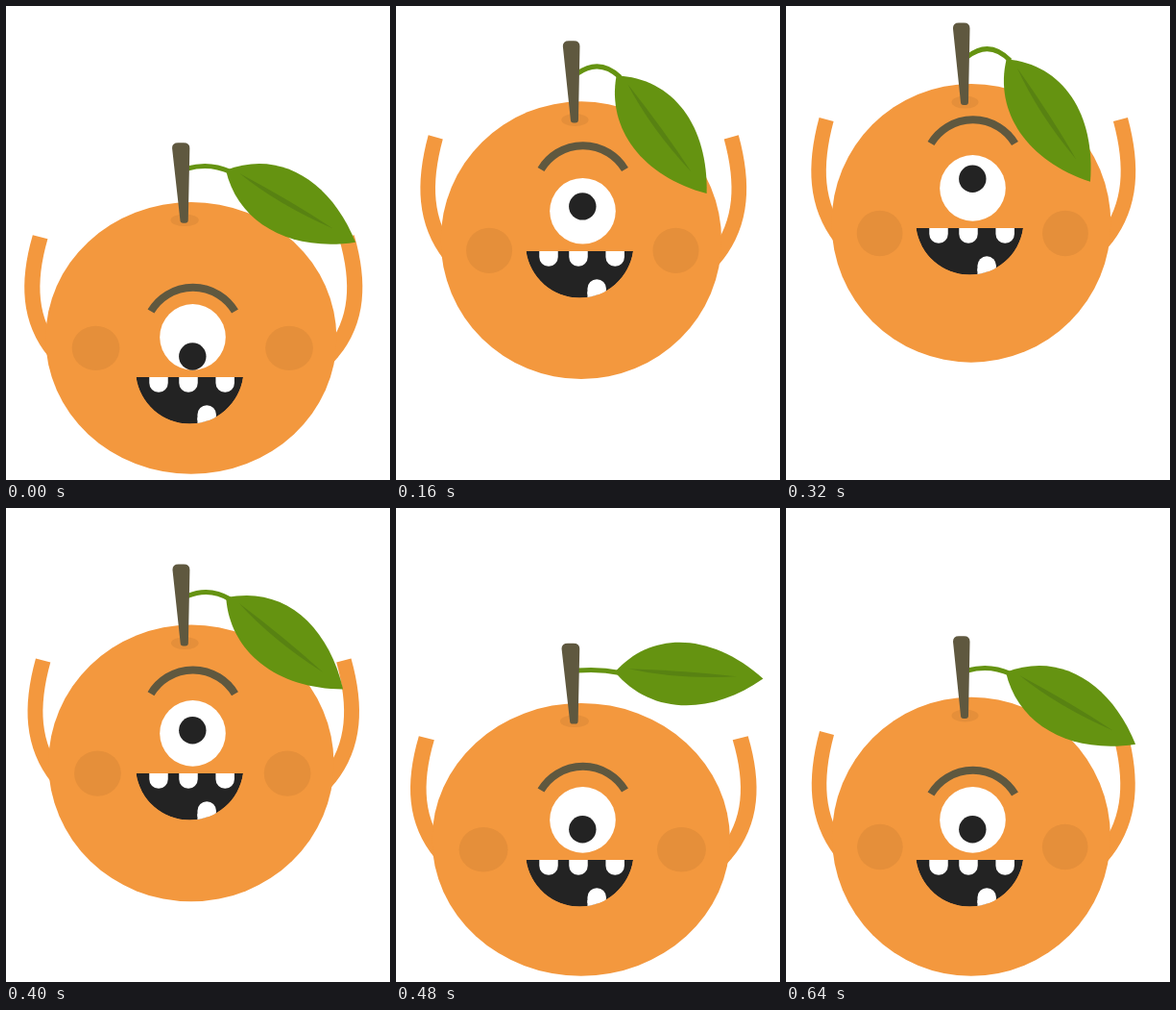
Animation, 400 px wide and 493 px high, one loop 680 ms. Source, as an HTML page:

```html
<!DOCTYPE html>
<html lang="en">
<head>
<meta charset="utf-8">
<title>Jumping orange</title>
<style>
  html, body { margin: 0; width: 100%; height: 100%; overflow: hidden; background: #fff; }
  svg { display: block; }
</style>
</head>
<body>
<svg width="400" height="493" viewBox="0 0 400 493">
  <defs>
    <path id="arm" d="M42.5 234C29.5 282 31 323 57 357l9 11" fill="none" stroke="#f3983e" stroke-width="15.5"/>
    <path id="smile" d="M-59 0A56.3 56.3 0 0 0 52.5 0Z"/>
    <path id="tooth" d="M-9.75 0V6A9.75 9.75 0 0 0 9.75 6V0Z"/>
    <clipPath id="mouth"><use href="#smile"/></clipPath>
  </defs>

  <g id="body">
    <use href="#arm"/>
    <use href="#arm" transform="matrix(-1 0 0 1 390.5 0)"/>
    <circle cx="192.9" cy="341.8" r="145" fill="#f3983e"/>
    <g fill="#e58f3a">
      <circle cx="97.9" cy="352.5" r="23.8"/>
      <circle cx="290.7" cy="352.5" r="23.8"/>
      <ellipse cx="186.5" cy="216" rx="14" ry="6.5"/>
    </g>
  </g>

  <path id="stalk" fill="none" stroke="#659311" stroke-width="5"/>
  <g id="stem">
    <path fill="#5f583f" d="M174 139Q174 133.3 180 133.3H185.5Q191.5 133.3 191.5 139L190 216Q190 219 187 219H185Q182 219 182 216Z"/>
  </g>
  <g id="leaf">
    <path fill="#659311" d="M0 0C38-46 100-44 154.5 0C100 42 38 42 0 0Z"/>
    <path fill="#588212" d="M14-4Q75-5 127-1Q65 5 14-4Z"/>
  </g>

  <path id="brow" d="M151 28.5A51 51 0 0 1 238.5 28.5" fill="none" stroke="#5f583f" stroke-width="8"/>
  <g id="face">
    <circle r="34.3" fill="#fff"/>
    <g transform="translate(0 41.7)" clip-path="url(#mouth)">
      <use href="#smile" fill="#232323"/>
      <g fill="#fff">
        <use href="#tooth" x="-35.5"/>
        <use href="#tooth" x="-4.5"/>
        <use href="#tooth" x="33.7"/>
        <use href="#tooth" transform="matrix(1 0 0 -1 14.7 44.9)"/>
        <path d="M4.95 42h19.5v10h-19.5z"/>
      </g>
    </g>
  </g>
  <circle id="pupil" cx="194.3" r="14.2" fill="#232323"/>
</svg>

<script>
const LOOP = 680, STEP = 40, APEX = 280, LAND = 480, SETTLE = 640;
const el = id => document.getElementById(id);
const set = (id, value, name = 'transform') => el(id).setAttribute(name, value);

// Decelerate to the apex, accelerate to the landing, ease out to rest.
function pose(t, crouch, apex, land, rest) {
  if (t <= APEX) return apex + (crouch - apex) * (1 - t / APEX) ** 2;
  if (t <= LAND) return apex + (land - apex) * ((t - APEX) / (LAND - APEX)) ** 2;
  return rest + (land - rest) * (1 - (t - LAND) / (SETTLE - LAND)) ** 2;
}

function draw(t) {
  const at = (...keys) => pose(t, ...keys);
  const rise = at(0, -121, 0, 0);
  const sx = at(1.045, 1, 1.07, 1), sy = at(.975, 1, .979, 1);
  const squash = `translate(195 ${486.5 + rise}) scale(${sx} ${sy}) translate(-195 -486.5)`;
  set('body', squash);
  set('stem', squash);

  // The leaf turns about a pivot just below its base.
  const angle = at(29, 57.8, 2.6, 29), y = 170.5 + rise;
  set('leaf', `translate(228 ${y + 2}) rotate(${angle}) translate(0 -2)`);
  set('stalk', `M189 ${y - 1.5}Q212 ${y - 3.5 - angle ** 2 / 190} 233.5 ${y + 1 + angle / 40}`, 'd');

  set('brow', `translate(0 ${at(289, 108.3, 265, 269)})`);
  set('face', `translate(194.5 ${at(344.4, 183.8, 324.4, 324.4)})`);
  set('pupil', at(364.5, 173.3, 334.3, 334.3), 'cy');
}

function tick() {
  draw(Math.floor(performance.now() % LOOP / STEP) * STEP);
  requestAnimationFrame(tick);
}
tick();
</script>
</body>
</html>
```
